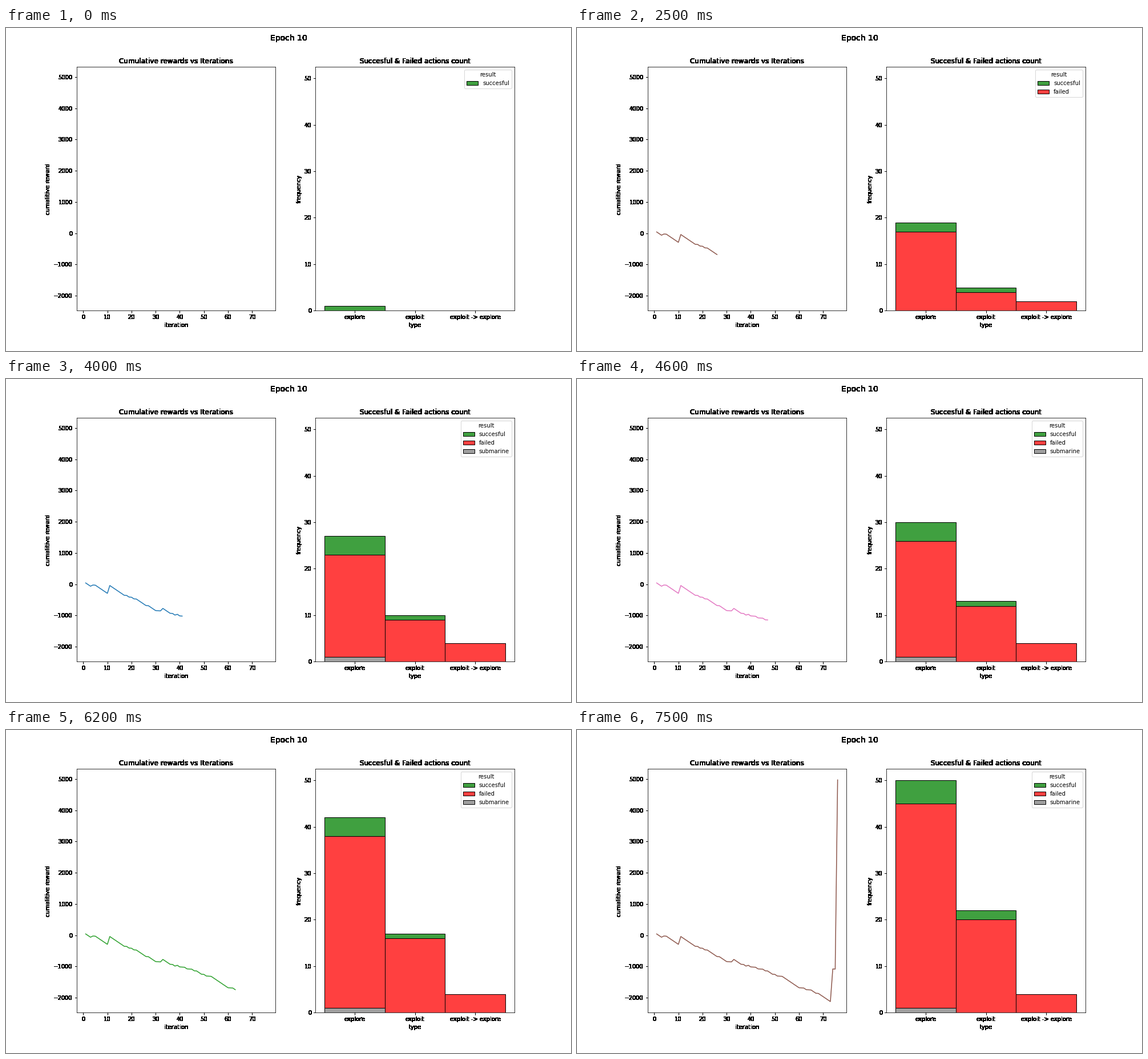
A matplotlib script for the animation above (7600 ms loop, 990 by 566 pixels).

```python
import numpy as np
import matplotlib.pyplot as plt
from matplotlib.animation import FuncAnimation

W, H, DPI = 990, 566, 72
STEPS = 76

# One letter per iteration: the action type and its result.
ACTIONS = ("sffsxrffffSxff" "fffxfxrfffff" "xrmfxxsf" "frxfsfxffxxfx"
           "ffxfxffffffffxxf" "xxfxxfffffsfS")
CODES = {"s": ("succesful", 0), "f": ("failed", 0), "m": ("submarine", 0),
         "S": ("succesful", 1), "x": ("failed", 1), "r": ("failed", 2)}
TYPES = ["explore", "exploit", "exploit -> explore"]
COLORS = {"succesful": "green", "failed": "red", "submarine": "gray"}

MISS, SMALL_MISS = -52.2, -5
SMALL = [5, 18, 20, 22, 27, 31, 32, 37, 41, 42, 44, 45, 47,
         50, 52, 53, 61, 62, 64, 65, 68, 75]
GAINS = {1: 40, 4: 38, 11: 250, 33: 80, 39: 25, 74: 1045, 76: 6060}


def total_rewards():
    steps = np.full(STEPS + 1, MISS)
    steps[0] = 0
    steps[SMALL] = SMALL_MISS
    for n, gain in GAINS.items():
        steps[n] = gain
    return np.cumsum(steps)


def running_counts():
    counts = {name: np.zeros((STEPS + 1, 3)) for name in COLORS}
    for n, code in enumerate(ACTIONS, 1):
        name, kind = CODES[code]
        counts[name][n:, kind] += 1
    return counts


def harden(img, dpi):
    """Turn every touched pixel solid black."""
    out = np.zeros_like(img)
    out[..., 3] = img[..., 3] > 0
    return out, 0, 0


def label(ax, title, xlabel, ylabel):
    ax.set_title(title).set_agg_filter(harden)
    ax.set_xlabel(xlabel)
    ax.set_ylabel(ylabel)
    ax.xaxis.set_agg_filter(harden)
    ax.yaxis.set_agg_filter(harden)


rewards = total_rewards()
counts = running_counts()
iterations = np.arange(STEPS + 1)

fig, (left, right) = plt.subplots(1, 2, figsize=(W / DPI, H / DPI), dpi=DPI)
fig.subplots_adjust(left=0.125, right=0.9, bottom=0.125, top=0.88, wspace=0.2)
fig.suptitle("Epoch 10", fontsize=14).set_agg_filter(harden)

label(left, "Cumulative rewards vs Iterations", "iteration", "cumalitive reward")
left.set(xlim=(-2.75, 79.75), ylim=(-2480, 5331),
         xticks=range(0, 80, 10), yticks=range(-2000, 5001, 1000))
line, = left.plot([], [], lw=1.5)

label(right, "Succesful & Failed actions count", "type", "frequency")
bars = {name: right.bar(range(3), [0] * 3, width=1, label=name, edgecolor="black",
                        facecolor=(color, 0.75), linewidth=1)
        for name, color in reversed(COLORS.items())}
right.set_xticks(range(3), TYPES)
right.set(xlim=(-0.65, 2.65), ylim=(0, 52.5), yticks=range(0, 51, 10))


def update(frame):
    n = frame + 1
    line.set_data(iterations[1:n + 1], rewards[1:n + 1])
    line.set_color(f"C{frame % 10}")

    base = np.zeros(3)
    for name, group in bars.items():
        heights = counts[name][n]
        for bar, y, h in zip(group, base, heights):
            bar.set(y=y, height=h, visible=heights.any())
        base = base + heights

    seen = [name for name in COLORS if counts[name][n].any()]
    right.legend([bars[name] for name in seen], seen,
                 title="result", loc="upper right")


anim = FuncAnimation(fig, update, frames=STEPS, interval=100,
                     repeat=True, repeat_delay=0, blit=False)
plt.show()
```
